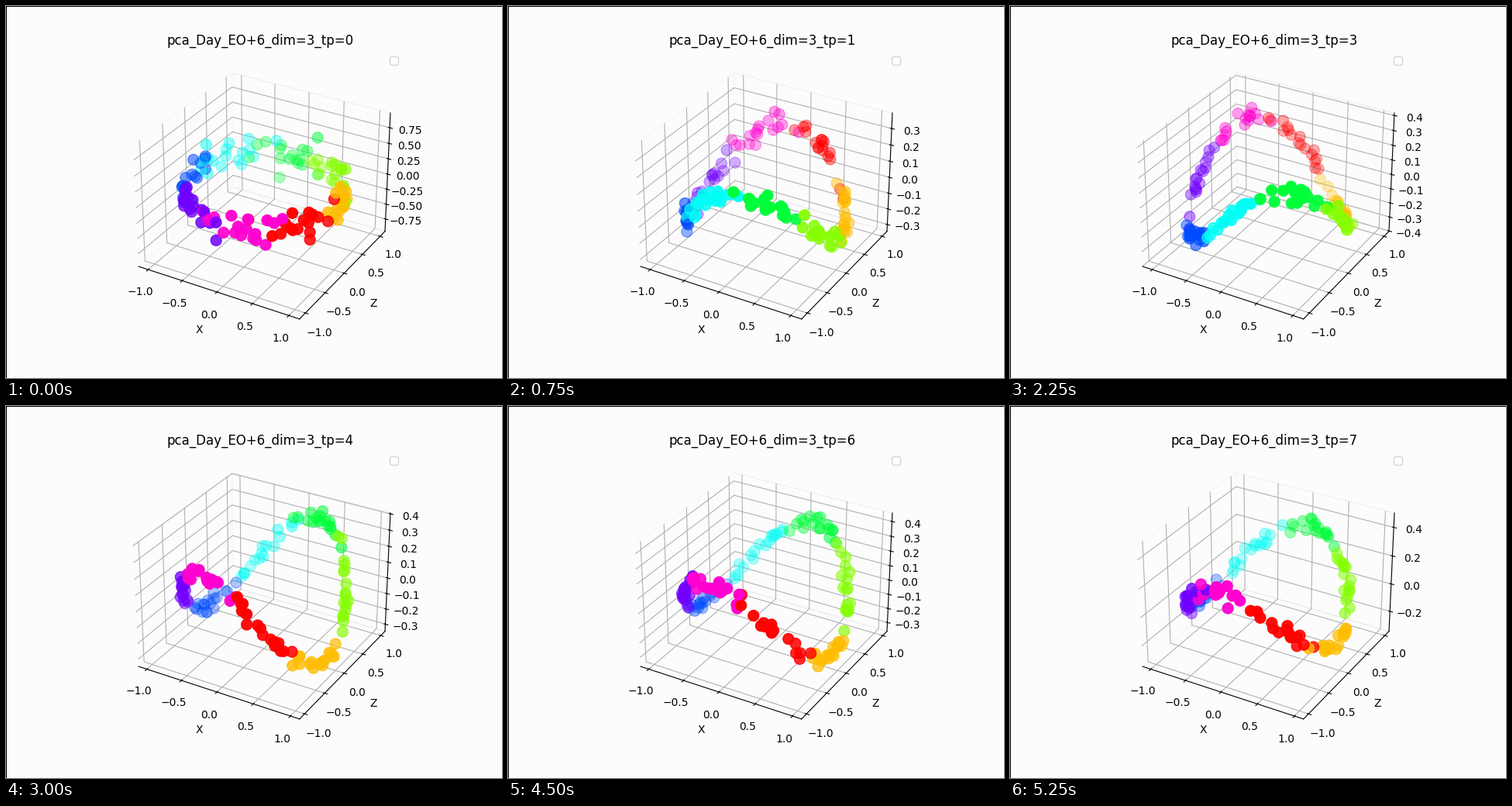
Recreate the animation shown at these times as a matplotlib script. Size 640x480 px, loop 6 s.

```python
import numpy as np
import matplotlib.pyplot as plt
from matplotlib.animation import FuncAnimation
from matplotlib.patches import Rectangle

W, H = 640, 480
PAPER = "#fcfcfc"
GROUPS, PER_GROUP = 8, 17
COLORS = plt.cm.hsv(np.arange(GROUPS) / GROUPS)

# Shape of the ring at key time points; the others lie in between
KEYS = [0, 1, 3, 4, 5, 7]
TURN = [1, -1, -1, 1, 1, 1]                     # direction of the colour wheel
START = [-32, 75, 95, -60, -61, -47]            # angle of the red group
SWAY = [0.0, 0.191, 0.254, 0.273, 0.28, 0.23]   # height of the saddle
PEAK = [0, 105, 130, 75, 75, 88]                # angle where the saddle is highest
NOISE = [0.14, 0.036, 0.025, 0.025, 0.025, 0.028]
SPREAD = [9, 6, 5, 5, 5, 6]                     # scatter along the ring, degrees
Z_LOW = [-0.96, -0.344, -0.4025, -0.347, -0.379, -0.348]
Z_HIGH = [0.983, 0.393, 0.4166, 0.405, 0.413, 0.499]


def at(tp, values):
    return np.interp(tp, KEYS, values)


def ring(tp):
    """Noisy saddle-shaped ring, one arc for each colour group."""
    rng = np.random.default_rng(tp + 3)
    group = np.repeat(np.arange(GROUPS), PER_GROUP)
    n = len(group)
    along = np.tile(np.linspace(-18, 18, PER_GROUP), GROUPS)
    angle = at(tp, START) + at(tp, TURN) * (45 * group + along)
    angle = np.radians(angle + rng.normal(0, at(tp, SPREAD), n))
    radius = 1 + rng.normal(0, 0.02, n)
    middle = (at(tp, Z_LOW) + at(tp, Z_HIGH)) / 2
    z = middle + at(tp, SWAY) * np.cos(2 * (angle - np.radians(at(tp, PEAK))))
    z += rng.normal(0, at(tp, NOISE), n)
    return radius * np.cos(angle), radius * np.sin(angle), z, COLORS[group]


def z_ticks(lo, hi):
    step = next(s for s in (0.1, 0.2, 0.25) if (hi - lo) / s < 8.4)
    return step * np.arange(np.ceil(lo / step), np.floor(hi / step) + 1)


fig = plt.figure(figsize=(W / 100, H / 100), dpi=100, facecolor=PAPER)
ax = fig.add_subplot(projection="3d")
for corner, w, h in (((0, 1 - 1 / H), 1, 1 / H), ((0, 0), 1 / W, 1)):
    fig.add_artist(Rectangle(corner, w, h, color="black", lw=0))


def draw(tp):
    ax.clear()
    ax.set_facecolor(PAPER)
    for axis in (ax.xaxis, ax.yaxis, ax.zaxis):
        axis.pane.fill = False

    x, y, z, colors = ring(tp)
    ax.scatter(x, y, z, c=colors, s=100)

    lo, hi = at(tp, Z_LOW), at(tp, Z_HIGH)
    reach = 1.144 if tp < 4 else 1.12
    ticks = np.arange(-2, 3) / 2
    ax.set(xticks=ticks, yticks=ticks, zticks=z_ticks(lo, hi))
    ax.set(xlim=(-reach, reach), ylim=(-reach, reach), zlim=(lo, hi))
    ax.set(xlabel="X", ylabel="Z", title=f"pca_Day_EO+6_dim=3_tp={tp}")
    ax.legend([], [], loc="upper right")
    return []


anim = FuncAnimation(fig, draw, frames=8, interval=750, init_func=lambda: [],
                     repeat=True, repeat_delay=0)
plt.show()
```
